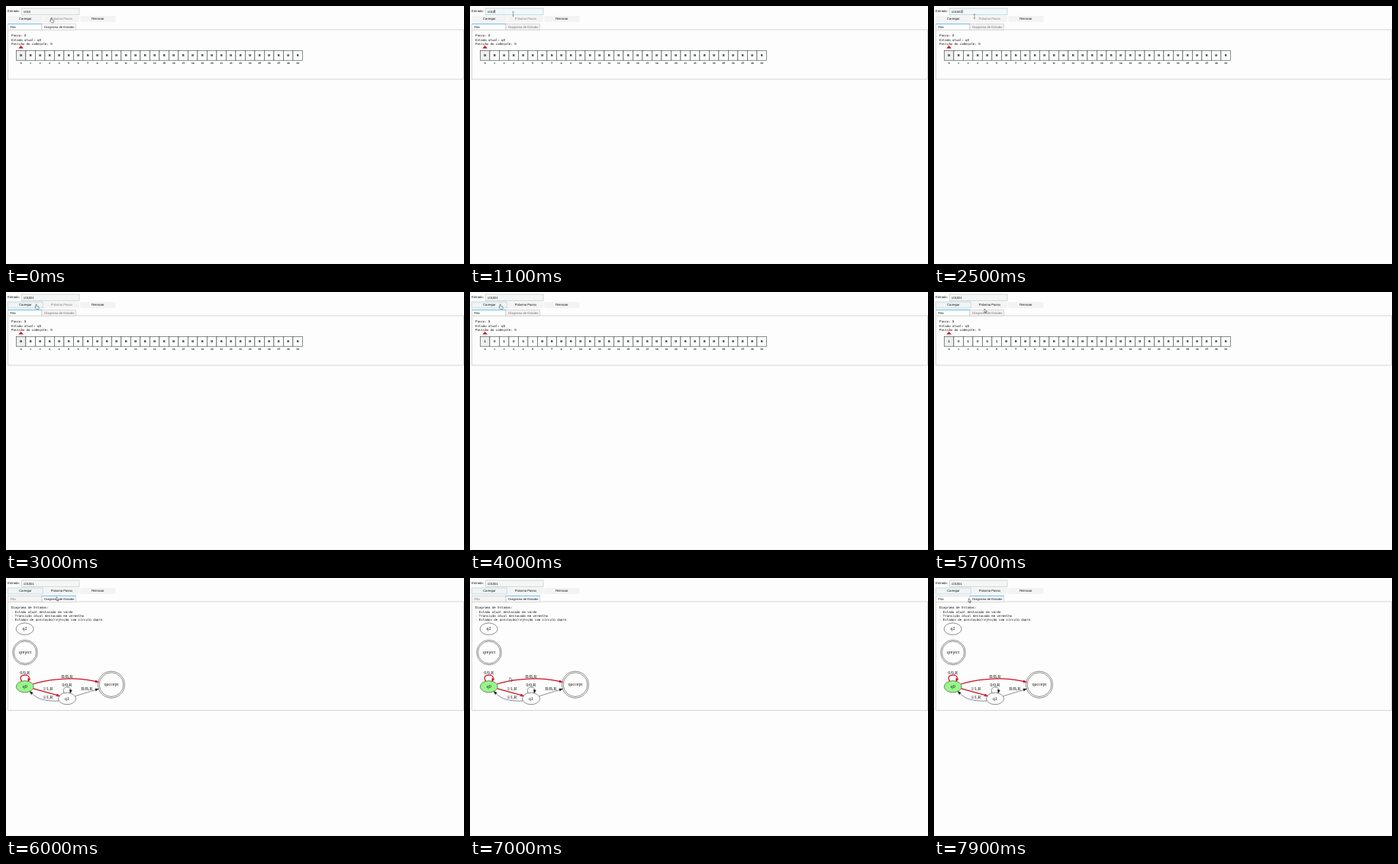
Animation, 600 px wide and 338 px high, one loop 8 s. Source, as an HTML page:

```html
<!DOCTYPE html>
<html lang="pt">
<head>
<meta charset="utf-8">
<title>Simulador de fita</title>
<style>
html, body { margin: 0; width: 100%; height: 100%; overflow: hidden; background: #fdfdfd; }
svg { display: block; width: 600px; height: 338px; }
text { font: 4.2px "Liberation Sans", Arial, sans-serif; fill: #111; white-space: pre; text-rendering: geometricPrecision; }
.mid { text-anchor: middle; }
.mono text { font: 4.05px "DejaVu Sans Mono", monospace; }
.graph text { font: 6px "Liberation Serif", serif; text-anchor: middle; }
.graph ellipse, .graph path { fill: none; stroke: #222; stroke-width: .5; }
.graph .head { fill: #111; }
.graph .hot { stroke: #cf1020; stroke-width: 1.2; }
.graph .hot.head { fill: #cf1020; stroke-width: .6; }
.cell { stroke: #3c4444; stroke-width: .6; fill: #fdfdfd; }
.cell.on { fill: #efefef; }
.sym { font-size: 4.4px; stroke: #111; stroke-width: .12; }
.idx { font-size: 3.1px; stroke: #111; stroke-width: .1; }
.line { stroke: #c4c4c4; stroke-width: .7; fill: #fdfdfd; }
.btn { fill: #f3f3f3; stroke: none; stroke-width: .7; }
.btn.focus { fill: #eff4f6; stroke: #b0cad3; }
#field { fill: #f4f5f5; stroke: #c2c8ca; stroke-width: .7; }
#field.focus { fill: #f2f7f8; stroke: #a6cbd9; }
.tab rect { fill: #f3f3f3; stroke: #c4c4c4; stroke-width: .6; }
.tab text { fill: #777; }
.tab.hover rect, .tab.sel rect { fill: #fdfdfd; }
.tab.hover text { fill: #222; }
.tab.sel text { fill: #111; }
.tab .top { stroke: none; }
.tab.sel .top { stroke: #6db9e8; stroke-width: 1; }
.cursor path { stroke: #222; stroke-width: .5; fill: #fff; stroke-linejoin: round; }
.cursor #beam { fill: none; stroke: #444; stroke-width: .5; }
</style>
</head>
<body>
<svg id="stage" viewBox="0 0 600 338"></svg>
<script>
const LOOP = 8000, CELLS = 30, PITCH = 12.5, LEFT = 13.4;
const $ = id => document.getElementById(id);

const text = (x, y, s, attrs = "") => `<text x="${x}" y="${y}" ${attrs}>${s}</text>`;
const lines = list => `<g class="mono">${list.map((s, i) => text(7, 40.2 + i * 5.35, s)).join("")}</g>`;
const oval = (x, y, rx, ry, fill = "none") =>
  `<ellipse cx="${x}" cy="${y}" rx="${rx}" ry="${ry}" style="fill:${fill}"/>`;
const node = (x, y, name, fill) => oval(x, y, 11.5, 7.7, fill) + text(x, y + 1.7, name);
const final = (x, y, r, name) => oval(x, y, r, r) + oval(x, y, r - 1.75, r - 1.75) + text(x, y + 1.7, name);

// Edge: curve, arrow tip with its heading in degrees, label
function edge(d, [x, y, turn], [lx, ly, label], hot = "") {
  return `<path class="${hot}" d="${d}"/>` +
    `<path class="head ${hot}" d="M0 0L-4.3 -1.5V1.5Z" transform="translate(${x} ${y}) rotate(${turn})"/>` +
    text(lx, ly, label);
}

const button = (id, x, w, label) =>
  `<rect class="btn" id="${id}" x="${x}" y="13" width="${w}" height="8"/>` +
  text(x + w / 2, 18.4, label, `class="mid" id="${id}Label"`);

function tab(id, x, w, label) {
  return `<g class="tab" id="${id}"><rect x="${x}" y="23.4" width="${w}" height="7.8"/>` +
    `<path class="top" d="M${x - .3} 23.5h${w + .6}"/>` +
    `<svg x="${x}" y="23" width="${w - 2.2}" height="8">${text(3.2, 5.5, label)}</svg></g>`;
}

function tape() {
  let out = "";
  for (let i = 0; i < CELLS; i++) {
    const x = LEFT + i * PITCH, c = x + PITCH / 2;
    out += `<rect class="cell${i ? "" : " on"}" x="${x}" y="58.4" width="${PITCH}" height="12.8"/>` +
      text(c, 66.4, "B", 'class="mid sym"') + text(c, 75.8, i, 'class="mid idx"');
  }
  return out;
}

const graph =
  node(24.6, 66.7, "q2") +
  final(25, 97.5, 16.3, "qreject") +
  final(138, 139.7, 17.5, "qaccept") +
  node(24.8, 142.3, "q0", "#98f58c") +
  node(80, 158, "q1") +
  edge("M20.6 135.2C17.8 130.8 19 127.2 25 127.2C29.4 127.2 31 129.4 30.2 132.4", [29, 136, 108], [24.8, 126, "0/0,R"], "hot") +
  edge("M35.3 139C52 133 82 130.6 100 132.6C107 133.3 113 134.4 117.2 135.4", [121.4, 136.4, 13], [80, 131, "B/B,R"], "hot") +
  edge("M35.8 144.8L66.5 153.4", [70.6, 154.6, 16], [55, 146.8, "1/1,R"], "hot") +
  edge("M69.4 161C58 161.6 46 160 40 156C37.5 154.4 36 153 34.5 151.6", [31, 148.6, 222], [55, 158, "1/1,R"]) +
  edge("M76 150.8C74.5 146.5 75.8 143 80 143C83.4 143 84.9 144.8 84.8 147", [84.2, 151, 98], [80, 141.6, "0/0,R"]) +
  edge("M90.4 154.8L117.3 146.6", [121.4, 145.3, -17], [106, 146.8, "B/B,R"]);

$("stage").innerHTML =
  '<rect width="600" height="338" fill="#fdfdfd"/><path d="M0 337.5H600" stroke="#f6f6f6"/>' +
  text(2, 8.4, "Entrada:") +
  '<rect id="field" x="20.2" y="3" width="75.8" height="8.4"/>' +
  text(22.8, 8.5, "", 'id="entry"') +
  '<path id="caret" d="M0 4.9v4.4" stroke="#111" stroke-width=".6"/>' +
  button("load", 2.2, 46.2, "Carregar") +
  button("next", 49.6, 46.4, "Próximo Passo") +
  button("reset", 97.2, 46.2, "Reiniciar") +
  '<rect class="line" id="panel" x="2.3" y="31" width="597.2" height="65"/>' +
  tab("tabTape", 2.3, 44.6, "Fita") + tab("tabGraph", 47, 44.6, "Diagrama de Estados") +
  `<g id="tape">${lines(["Passo: 0", "Estado atual: q0", "Posição do cabeçote: 0"])}` +
  `<path d="M19.6 52L23 55.4H16.2Z" fill="#cf1020"/>${tape()}</g>` +
  `<g id="graph">${lines(["Diagrama de Estados:", "- Estado atual destacado em verde",
    "- Transição atual destacada em vermelho",
    "- Estados de aceitação/rejeição com círculo duplo"])}<g class="graph">${graph}</g></g>` +
  `<g class="cursor" id="cursor">
    <path id="hand" d="M0 .4Q.6 -.3 1.1 .4V2.6L3.6 3.1Q4.3 3.3 4.2 4L3.7 6.3H.7L-1.2 4Q-1.2 3.2 -.3 3.6L0 3.8Z"/>
    <path id="arrow" d="M0 0V5L1.2 4L2 5.8L2.8 5.4L2 3.7H3.6Z"/>
    <path id="beam" d="M-1 -2.8H1M0 -2.8V2.8M-1 2.8H1"/>
  </g>`;

// Each track: [start ms, ...values], held until the next entry
const pointer = [
  [0, "hand", 58.7, 15.4], [100, "beam", 58, 10.5], [600, "beam", 57.6, 9], [700, "beam", 57, 9],
  [800, "beam", 56.8, 9.6], [900, "beam", 56.6, 10.4], [1500, "beam", 56, 11], [2100, "beam", 54, 12.6],
  [2200, "beam", 53, 13.6], [2700, "hand", 44, 15.6], [2900, "hand", 40.4, 15.8], [3000, "hand", 39, 16],
  [4500, "hand", 48.8, 15.4], [4700, "hand", 60, 15.8], [4800, "hand", 68.6, 16.6], [5000, "hand", 69, 17],
  [5300, "hand", 69, 17.4], [5500, "hand", 68, 18.6], [5600, "arrow", 67, 21], [5700, "arrow", 66, 22],
  [6000, "arrow", 66, 24.6], [6100, "arrow", 66, 29], [6200, "arrow", 65.6, 38], [6300, "arrow", 65, 51],
  [6500, "arrow", 62, 72], [6600, "arrow", 56, 98], [6700, "arrow", 49, 120], [6900, "arrow", 48, 126],
  [7000, "arrow", 52, 130], [7100, "arrow", 60, 134], [7200, "arrow", 68, 134], [7300, "arrow", 70, 122],
  [7400, "arrow", 66, 103], [7500, "arrow", 60, 80], [7600, "arrow", 53, 55], [7700, "arrow", 48, 36],
  [7800, "arrow", 46, 29], [7900, "arrow", 45.2, 27]
];
const typed = [[0, "1010"], [2100, "10100"], [2500, "101001"]];
const caret = [[0, 0], [700, 1], [1500, 0], [2100, 1], [2900, 0]];

const at = (track, t) => track.filter(k => k[0] <= t).pop().slice(1);
const show = (id, on) => { $(id).style.display = on ? "" : "none"; };
const mark = (id, name, on) => $(id).classList.toggle(name, on);

function draw(t) {
  const [kind, x, y] = at(pointer, t), [entry] = at(typed, t);
  const loaded = t >= 3700, diagram = t >= 6000;

  $("entry").textContent = entry;
  $("caret").setAttribute("transform", `translate(${23.1 + entry.length * 2.336} 0)`);
  show("caret", at(caret, t)[0]);
  mark("field", "focus", t >= 700 && t < 2900);
  mark("load", "focus", t >= 2900);
  $("nextLabel").style.fill = loaded ? "#111" : "#808080";

  document.querySelectorAll(".sym").forEach((s, i) => {
    s.textContent = loaded && entry[i] || "B";
  });
  show("tape", !diagram);
  show("graph", diagram);
  $("panel").setAttribute("height", diagram ? 142.6 : 65);
  mark("tabTape", "sel", !diagram);
  mark("tabGraph", "sel", diagram);
  mark("tabTape", "hover", t >= 7900);
  mark("tabGraph", "hover", t < 600);

  $("cursor").setAttribute("transform", `translate(${x} ${y})`);
  for (const id of ["hand", "arrow", "beam"]) show(id, id === kind);
}

const start = performance.now();
function tick() {
  draw((performance.now() - start) % LOOP);
  requestAnimationFrame(tick);
}
tick();
</script>
</body>
</html>
```
